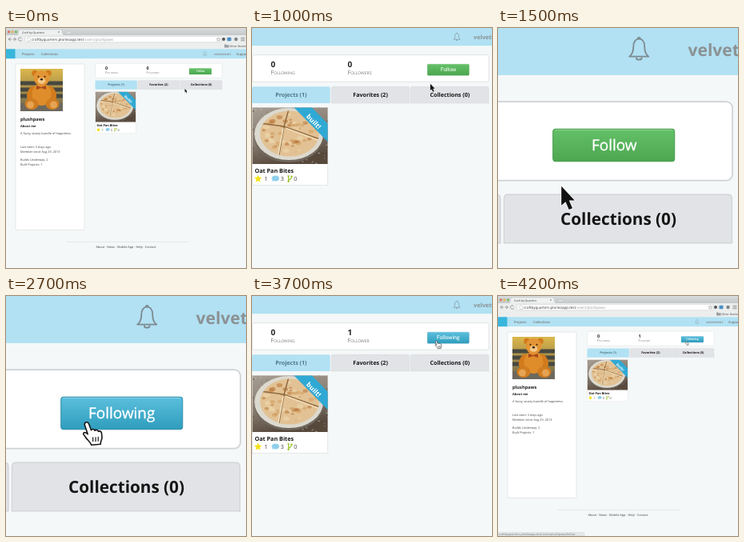
Write an HTML page that moves like this. It is 300 by 300 pixels and loops after 5200 ms.

```html
<!DOCTYPE html>
<html lang="en">
<head>
<meta charset="utf-8">
<title>Follow a maker</title>
<style>
  html, body { margin: 0; width: 100%; height: 100%; overflow: hidden; background: #f5f8f8; }
  body { position: relative; }
  text { font-family: "Open Sans", sans-serif; text-rendering: geometricPrecision; }
  .b { font-weight: 700; }
  .mid { text-anchor: middle; }
  .caps { font-variant: small-caps; font-size: 7.2px; fill: #777; }
  .label { font-size: 18.9px; text-anchor: middle; fill: #fff; stroke: #fff; stroke-width: .35; }

  .cam, .far, .near, .hand, .before, .after, .hover, .press, .status {
    animation: 5.2s step-end infinite;
  }
  .cam { position: absolute; display: block; animation-name: cam; }
  .far { animation-name: far; }
  .near { animation-name: near; }
  .hand { animation-name: hand; }
  .before { animation-name: before; }
  .after { animation-name: after; }
  .hover { animation-name: hover; }
  .press { animation-name: press; }
  .status { animation-name: status; }

  /* wide page, panel, button, panel, wide page; sized by layout to keep text sharp */
  @keyframes cam {
    0%, 80.76%, 100% { width: 100vw; height: 100vh; left: 0; top: 0; }
    19.23%, 71.15% { width: 186.6vw; height: 186.6vh; left: -69.333vw; top: -16.333vh; }
    28.84% { width: 544.9vw; height: 544.9vh; left: -393vw; top: -49.667vh; }
  }
  @keyframes far { 0% { visibility: visible; } 19.23%, 100% { visibility: hidden; } }
  @keyframes near { 0%, 38.46%, 100% { visibility: hidden; } 19.23% { visibility: visible; } }
  @keyframes hand { 0% { visibility: hidden; } 38.46%, 100% { visibility: visible; } }
  @keyframes before { 0% { visibility: visible; } 51.92%, 100% { visibility: hidden; } }
  @keyframes after { 0% { visibility: hidden; } 51.92%, 100% { visibility: visible; } }
  @keyframes hover { 0%, 51.92%, 100% { visibility: hidden; } 38.46% { visibility: visible; } }
  @keyframes press { 0%, 51.92%, 100% { visibility: hidden; } 48.07% { visibility: visible; } }
  @keyframes status { 0% { visibility: hidden; } 80.76%, 100% { visibility: visible; } }
</style>
</head>
<body>
<svg class="cam" viewBox="0 0 300 300">
  <defs>
    <linearGradient id="green" x2="0" y2="1">
      <stop stop-color="#64c168"/><stop offset="1" stop-color="#4ca650"/>
    </linearGradient>
    <linearGradient id="blue" x2="0" y2="1">
      <stop stop-color="#5bbfdd"/><stop offset="1" stop-color="#2f9dbd"/>
    </linearGradient>
    <linearGradient id="strip" x2="0" y2="1">
      <stop stop-color="#d9dcdc"/><stop offset="1" stop-color="#c4c8c8"/>
    </linearGradient>
    <linearGradient id="park" x2="0" y2="1">
      <stop stop-color="#dcb84c"/><stop offset=".4" stop-color="#b0954a"/><stop offset="1" stop-color="#6a6450"/>
    </linearGradient>
    <linearGradient id="stone" x2=".3" y2="1">
      <stop stop-color="#a79e93"/><stop offset=".6" stop-color="#857a6e"/><stop offset="1" stop-color="#57483c"/>
    </linearGradient>
    <clipPath id="photo"><path d="M18 51h53v53H18z"/></clipPath>
    <clipPath id="dish"><path d="M.5 99.5h94v70.5H.5z"/></clipPath>
    <clipPath id="crust"><ellipse cx="47" cy="132" rx="37" ry="28.500"/></clipPath>
    <path id="arrow" d="M79 198v24l5.300-4.600 4.200 9.800 4.300-1.800-4.200-9.600h7z" fill="#111" stroke="#fff" stroke-width="1.400" paint-order="stroke"/>
  </defs>

  <rect width="300" height="300" fill="#f5f8f8"/>

  <!-- browser window -->
  <rect width="300" height="9" fill="url(#strip)"/>
  <g stroke="#888" stroke-width=".2">
    <circle cx="3.500" cy="4.800" r="1.500" fill="#ee6b5f"/>
    <circle cx="8" cy="4.800" r="1.500" fill="#f3be4f"/>
    <circle cx="12.500" cy="4.800" r="1.500" fill="#69c657"/>
  </g>
  <path d="M13 9.200q2-.4 2.500-3l.6-3q.3-1.200 1.600-1.200H68q1.400 0 1.800 1.200l.8 3q.7 2.800 2.400 3z" fill="#eff1f1" stroke="#aaa" stroke-width=".3"/>
  <text x="20" y="7" font-size="3.500" fill="#333">Craft by Quarters</text>
  <path d="M65 4l2 2m0-2l-2 2" stroke="#777" stroke-width=".5"/>
  <path d="M74 4h7l1.500 3.500h-7z" fill="#d8dcdc" stroke="#aaa" stroke-width=".3"/>
  <rect y="9" width="300" height="17.300" fill="#eceeee"/>
  <path d="M5.500 12L3 14l2.500 2M3 14h4M10 12l2.500 2-2.500 2M8.500 14h4M19.500 12.800a2.200 2.200 0 1 0 .3 2" fill="none" stroke="#888" stroke-width=".8"/>
  <rect x="24" y="10.400" width="245" height="7.400" rx="1" fill="#fff" stroke="#bbb" stroke-width=".4"/>
  <path d="M27 12h2.500l1 1v3.500H27z" fill="#fff" stroke="#999" stroke-width=".4"/>
  <text x="32" y="15.700" font-size="4.500" fill="#333">craftbyquarters.plonkoapp.test<tspan fill="#999">/users/plushpaws</tspan></text>
  <path d="M265.500 11.700l.7 1.700h1.800l-1.400 1.200.5 1.800-1.600-1-1.600 1 .5-1.800-1.400-1.200h1.800z" fill="none" stroke="#888" stroke-width=".5"/>
  <circle cx="272" cy="14" r="2" fill="#555"/>
  <rect x="276.500" y="11.800" width="5" height="4.500" rx=".8" fill="#4d8fc4"/>
  <circle cx="287.500" cy="14" r="2.200" fill="#7c8489"/>
  <path d="M293.500 12.200h5m-5 1.800h5m-5 1.800h5" stroke="#777" stroke-width=".7"/>
  <path d="M273 20.500h2l.6.700h3v3.300H273z" fill="#9a9fa3"/>
  <text x="279.500" y="24" font-size="3.500" fill="#444">Other Bookmarks</text>

  <!-- site header -->
  <rect y="26.300" width="300" height="11.850" fill="#b1e1f3"/>
  <rect y="26.300" width="11.500" height="11.850" fill="#38b6dc"/>
  <g font-size="4" fill="#777" font-weight="600">
    <text x="20" y="33.700">Projects</text>
    <text x="44" y="33.700">Collections</text>
    <text x="288" y="33.700">Support</text>
  </g>

  <!-- profile -->
  <rect x="12" y="45" width="86" height="207.500" rx="1" fill="#fff" stroke="#d9dcdc" stroke-width=".6"/>
  <g clip-path="url(#photo)">
    <path d="M18 51h53v53H18z" fill="url(#park)"/>
    <path d="M18 69h53m-53 8h53m-53 8h53" stroke="#47483f" stroke-width="5"/>
    <path d="M18 94h53v10H18z" fill="#6d685e"/>
    <g fill="#d27b1c">
      <circle cx="36" cy="56.500" r="3.800"/><circle cx="53" cy="56.500" r="3.800"/>
      <ellipse cx="31.500" cy="81" rx="4.700" ry="9" transform="rotate(24 31.500 81)"/>
      <ellipse cx="57.500" cy="81" rx="4.700" ry="9" transform="rotate(-24 57.500 81)"/>
    </g>
    <ellipse cx="44.500" cy="83" rx="12" ry="14" fill="#df8d2a"/>
    <ellipse cx="44.500" cy="62.500" rx="10" ry="9.500" fill="#e39535"/>
    <ellipse cx="44.500" cy="66" rx="4.800" ry="3.800" fill="#f2c888"/>
    <path d="M38 72l6 2 6-2v5l-6-2-6 2z" fill="#a8481f"/>
    <g fill="#35200f"><circle cx="40.500" cy="60.800" r="1"/><circle cx="48.500" cy="60.800" r="1"/><ellipse cx="44.500" cy="64.300" rx="1.700" ry="1.200"/></g>
    <g fill="#d07c1f"><ellipse cx="32" cy="95" rx="8.500" ry="7"/><ellipse cx="58" cy="95" rx="8.500" ry="7"/></g>
    <g fill="#e5a454"><ellipse cx="30.500" cy="96" rx="4.500" ry="4.500"/><ellipse cx="59.500" cy="96" rx="4.500" ry="4.500"/></g>
  </g>
  <text class="b" x="18" y="115.800" font-size="5.700" fill="#222">plushpaws</text>
  <text class="b" x="18" y="123.500" font-size="4" fill="#222">About me</text>
  <g font-size="3.850" fill="#444">
    <text x="18" y="132.500">A fuzzy, wuzzy bundle of happiness.</text>
    <text x="18" y="150">Last seen: 3 days ago</text>
    <text x="18" y="155.500">Member since Aug 29, 2013</text>
    <text x="18" y="166">Builds Underway: 2</text>
    <text x="18" y="171.500">Built Projects: 1</text>
  </g>

  <path d="M75 267.300h153" stroke="#d5d8d8" stroke-width=".6"/>
  <text class="mid" x="150" y="274.500" font-size="3.850" fill="#444">About · News · Mobile App · Help · Contact</text>

  <!-- right panel -->
  <g transform="translate(111.500 26.300) scale(.536)">
    <rect x=".2" y="33.500" width="295.800" height="33.700" rx="2.700" fill="#fff" stroke="#d0d2d4" stroke-width=".6"/>
    <g class="b" font-size="10" fill="#222">
      <text x="23.500" y="48.700">0</text>
      <text class="before" x="119.500" y="48.700">0</text>
      <text class="after" x="119.500" y="48.700">1</text>
    </g>
    <text class="caps" x="23.500" y="58.200">Following</text>
    <text class="caps" x="119.500" y="58.200">Follower<tspan class="before">s</tspan></text>

    <path d="M0 94V75q0-1.800 1.800-1.800h94q1.800 0 1.800 1.800v19z" fill="#b1e1f3"/>
    <path d="M99.100 94V75q0-1.800 1.800-1.800h94q1.800 0 1.800 1.800v19zM198.200 94V75q0-1.800 1.800-1.800h94q1.800 0 1.800 1.800v19z" fill="#e2e3e6" stroke="#d0d1d4" stroke-width=".4"/>
    <g class="b mid" font-size="7.100" fill="#151515">
      <text x="48.800" y="86.100" fill="#4f7887">Projects (1)</text>
      <text x="148" y="86.100">Favorites (2)</text>
      <text x="247.200" y="86.100">Collections (0)</text>
    </g>

    <!-- project card -->
    <rect x=".3" y="99.300" width="94.400" height="97.200" fill="#fff" stroke="#d8dada" stroke-width=".6"/>
    <g clip-path="url(#dish)">
      <path d="M0 99h95v72H0z" fill="url(#stone)"/>
      <g id="grit"/>
      <ellipse cx="46" cy="136" rx="43" ry="32" fill="#6f675d"/>
      <ellipse cx="46" cy="132.500" rx="43" ry="32.500" fill="#dcd9cf"/>
      <g clip-path="url(#crust)">
        <path d="M8 100h80v66H8z" fill="#e2c294"/>
        <g id="toast"/>
        <path d="M40 123L10 119M40 123l6-22M40 123l-7 40M40 123l48 17" stroke="#8f6a42" stroke-width="1.500"/>
        <path d="M39 125l-7 38M42 125l46 17" stroke="#f3e2bf" stroke-width="1.500"/>
      </g>
      <path d="M52 99h22.500L95 120v22.500z" fill="#2fa9d4"/>
      <text class="b mid" font-size="8.500" fill="#fff" transform="translate(75 119) rotate(46)">built!</text>
    </g>
    <text class="b" x="3.500" y="181" font-size="7.200" fill="#151515">Oat Pan Bites</text>
    <path d="M7.500 183.500l1.400 3 3.300.400-2.400 2.300.6 3.300-2.900-1.600-2.900 1.600.6-3.300-2.400-2.300 3.300-.400z" fill="#f2e21b"/>
    <path d="M29.500 184.300c6 0 6 7 0 7q-1.300 0-2.200-.300l-2.300 1 .8-1.900c-3-2.500-.5-5.800 3.700-5.800z" fill="#8fd0ec"/>
    <path d="M45.500 185v7m0-2q4-1.500 4-4.500" fill="none" stroke="#9ac52d" stroke-width="1.200"/>
    <g fill="#9ac52d"><circle cx="45.500" cy="185" r="1.200"/><circle cx="49.500" cy="185.500" r="1.200"/><circle cx="45.500" cy="191.700" r="1.200"/></g>
    <g font-size="7.200" fill="#444">
      <text x="15.500" y="191.300">1</text><text x="35.800" y="191.300">3</text><text x="52.200" y="191.300">0</text>
    </g>

    <text class="b" x="277" y="13.800" font-size="7.200" fill="#8c9294">velvettwirl</text>

    <!-- bell, button and pointers in close-up units -->
    <g transform="scale(.34247) translate(571.500 5.400)">
      <g fill="none" stroke="#7d8a90" stroke-width="1.800" stroke-linejoin="round">
        <path d="M164 36c4-3 5-6 5-12 0-7 3-10 7-10s7 3 7 10c0 6 1 9 5 12z"/>
        <path d="M174.500 14c0-2.500 3-2.500 3 0M172.500 37c0 4 7 4 7 0"/>
      </g>
      <g class="before">
        <rect x="68.500" y="126.500" width="152" height="40.500" rx="3.500" fill="url(#green)" stroke="#479b4b"/>
        <path d="M71 127.700h147" stroke="#8bd38e"/>
        <rect class="hover" x="68" y="126" width="153" height="41.500" rx="3.500" fill-opacity=".08"/>
        <rect class="press" x="68" y="126" width="153" height="41.500" rx="3.500" fill-opacity=".1"/>
        <text class="label" x="145" y="153.300">Follow</text>
      </g>
      <g class="after">
        <rect x="68.500" y="126.500" width="152" height="40.500" rx="3.500" fill="url(#blue)" stroke="#2c8ca9"/>
        <path d="M71 127.700h147" stroke="#88d3e9"/>
        <text class="label" x="144.500" y="153.300">Following</text>
      </g>
      <use class="far" href="#arrow" x="-40" y="67"/>
      <use class="near" href="#arrow"/>
      <g class="hand" stroke="#151515" stroke-linejoin="round" stroke-linecap="round">
        <path d="M98 161c0-3.500 4-4 5.300-1l3 8c1-2 4-1.500 4.500.5 1-1.500 4-1 4.500 1 1.500-1 4 0 4 2.500l.5 5c0 3-1.800 4-1.800 8.500l-11.500 1c-1-4-5-6-7.500-10-1-2-3-3-2.500-4.500.8-2 4-1 5.500 1z" fill="#fff" stroke-width="1.600"/>
        <path d="M108.500 177v5m3.300-5v5m3.200-5.500v5" fill="none" stroke-width="1.200"/>
      </g>
    </g>
  </g>

  <g class="status">
    <path d="M0 295.500h106q2 0 2 2V300H0z" fill="#e6e9e9" stroke="#ccc" stroke-width=".4"/>
    <text x="1" y="299.300" font-size="3.700" fill="#777">craftbyquarters.plonkoapp.test/users/plushpaws/follow</text>
  </g>
</svg>
<script>
  let seed = 11;
  const rand = (lo, hi) => {
    seed = (seed * 16807) % 2147483647;
    return lo + (hi - lo) * seed / 2147483647;
  };

  function scatter(id, count, place, size, colours) {
    const group = document.getElementById(id);
    for (let i = 0; i < count; i++) {
      const dot = document.createElementNS("http://www.w3.org/2000/svg", "ellipse");
      const [x, y] = place();
      const r = rand(...size);
      const set = { cx: x, cy: y, rx: r, ry: r * .7, fill: colours[i % colours.length], opacity: .6 };
      for (const key in set) dot.setAttribute(key, set[key]);
      group.append(dot);
    }
  }

  scatter("grit", 160, () => [rand(0, 95), rand(99, 171)], [.4, 1.3], ["#c9c2b8", "#51473e", "#75695c"]);
  scatter("toast", 60, () => {
    const a = rand(0, Math.PI * 2), d = rand(.3, .95);
    return [47 + 36 * d * Math.cos(a), 132 + 27 * d * Math.sin(a)];
  }, [1, 4], ["#bd7a3f", "#d3a062", "#efd9ae"]);
</script>
</body>
</html>
```
